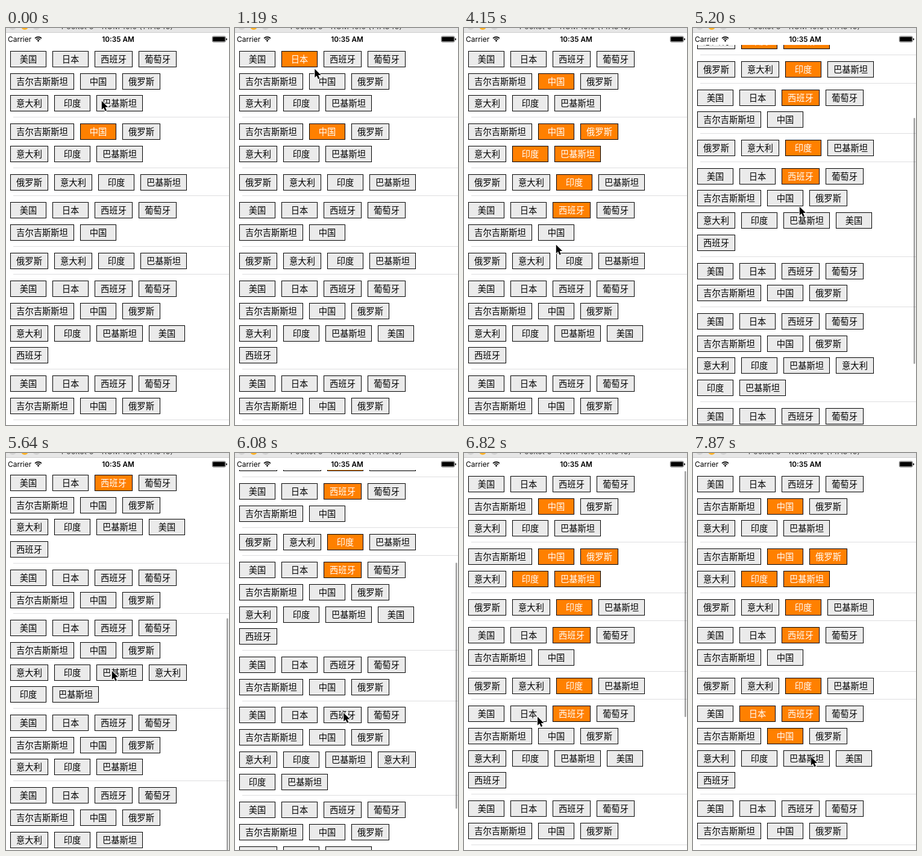
An HTML page with a canvas that plays this animation: 370 by 657 pixels, repeating every 8000 ms.

```html
<!DOCTYPE html>
<html lang="zh-CN">
<head>
<meta charset="utf-8">
<title>Tag list</title>
<style>
  html, body { margin: 0; width: 100%; height: 100%; overflow: hidden; background: #fff; }
  canvas { display: block; }
</style>
</head>
<body>
<canvas id="stage" width="370" height="657"></canvas>
<script>
(() => {
  const ctx = document.getElementById('stage').getContext('2d');
  const W = 370, H = 657;
  const LOOP = 8000, STEP = 148.5;
  const CLIP = 28, ROW = 36.7, GAP = 10, FIRST = 51.5, WRAP = 320;
  const PEAK = 382.6, MAX_SCROLL = 370;
  const BAR_TOP = 30, BAR_LEN = 407, BAR_RATIO = 0.637;
  const TAP_DELAY = 2;
  const LATIN = 'Inter, Roboto, sans-serif';
  const CJK = '"Noto Sans CJK SC", "Noto Sans CJK", sans-serif';

  const names = '美国 日本 西班牙 葡萄牙 吉尔吉斯斯坦 中国 俄罗斯 意大利 印度 巴基斯坦'.split(' ');
  const sections = [
    names, names.slice(4), names.slice(6), names.slice(0, 6), names.slice(6),
    [...names, names[0], names[2]],
    names.slice(0, 7),
    [...names, ...names.slice(7)],
    names, names
  ];

  // Pointer stops: step, x, y, tap
  const stops = [
    [0, 158, 120, 1], [5, 113, 46, 1], [6, 113, 46], [10, 150, 88, 1], [13, 205, 190],
    [15, 211, 164, 1], [17, 110, 205, 1], [19, 180, 205, 1], [21, 178, 255, 1], [22, 174, 288],
    [24, 172, 300, 1], [28, 152, 358], [29, 165, 380, 1], [31, 172, 428, 1], [35, 176, 295],
    [38, 175, 360], [43, 182, 467], [47, 110, 430, 1], [50, 150, 466, 1], [52, 195, 489],
    [53, 195, 502]
  ];

  function ease(k, from, to) {
    const u = Math.max(0, Math.min(1, (k - from) / (to - from)));
    return u * u * (3 - 2 * u);
  }

  // One flick to the end of the list, one back to the start.
  const scrollAt = k => PEAK * (ease(k, 32, 38.1) - ease(k, 38.1, 45.04));

  function pointerAt(k) {
    const n = Math.max(1, stops.findIndex(s => s[0] >= k));
    const [k0, x0, y0] = stops[n - 1], [k1, x1, y1] = stops[n];
    const u = ease(k, k0, k1);
    return [x0 + (x1 - x0) * u, y0 + (y1 - y0) * u];
  }

  // Lay out the tags once; only the scroll offset changes later.
  const tags = [], rules = [];
  let rowY = FIRST;
  sections.forEach((list, section) => {
    let x = 7;
    for (const text of list) {
      const w = Math.max(60, text.length * 14.3 + 20);
      if (x + w > WRAP) { x = 7; rowY += ROW; }
      tags.push({ text, section, x, y: rowY, w, on: Infinity, off: Infinity });
      x += w + 10;
    }
    rowY += ROW + GAP;
    rules.push(rowY - 23.9);
  });

  // A tap selects the tag under it; the first section allows one choice only.
  tags.find(t => t.section === 1 && t.text === '中国').on = 0;
  for (const [k, x, y, tap] of stops) {
    if (!tap) continue;
    const hit = tags.find(t => x >= t.x && x <= t.x + t.w && Math.abs(y - t.y) <= 14);
    if (!hit) continue;
    const at = k + TAP_DELAY;
    if (hit.section === 0) {
      for (const t of tags) if (t.section === 0 && t.on < at) t.off = Math.min(t.off, at);
    }
    hit.on = at;
  }

  function label(text, x, y, font, color, align = 'left') {
    ctx.font = font;
    ctx.fillStyle = color;
    ctx.textAlign = align;
    ctx.fillText(text, x, y);
  }

  function disc(x, y, r, color) {
    ctx.fillStyle = color;
    ctx.beginPath();
    ctx.arc(x, y, r, 0, Math.PI * 2);
    ctx.fill();
  }

  function drawTag(tag, y, on) {
    const x = Math.round(tag.x), t = Math.round(y - 13.5);
    const w = Math.round(tag.x + tag.w) - x;
    ctx.fillStyle = on ? '#ff8000' : '#ebebeb';
    ctx.fillRect(x, t, w, 27);
    ctx.strokeStyle = '#000';
    ctx.lineWidth = 1;
    ctx.strokeRect(x + 0.5, t + 0.5, w - 1, 26);
    label(tag.text, x + w / 2, t + 19, '14.3px ' + CJK, on ? '#fff' : '#000', 'center');
  }

  function drawList(k, offset) {
    ctx.save();
    ctx.beginPath();
    ctx.rect(0, CLIP, W, H - CLIP);
    ctx.clip();
    ctx.fillStyle = '#dedee0';
    for (const y of rules) ctx.fillRect(12, Math.floor(y - offset), W - 12, 1);
    for (const tag of tags) {
      const y = tag.y - offset;
      if (y > CLIP - 15 && y < H + 15) drawTag(tag, y, k >= tag.on && k < tag.off);
    }
    ctx.restore();
  }

  function drawBar(k, offset) {
    const alpha = k < 33 ? 0 : 1 - ease(k, 46, 50);
    if (!alpha) return;
    const len = BAR_LEN - Math.max(0, offset - MAX_SCROLL);
    ctx.fillStyle = `rgba(0,0,0,${0.38 * alpha})`;
    ctx.beginPath();
    ctx.roundRect(366, BAR_TOP + offset * BAR_RATIO, 2.5, len, 1.2);
    ctx.fill();
  }

  function drawWifi(x, y) {
    ctx.strokeStyle = ctx.fillStyle = '#000';
    ctx.lineWidth = 1.7;
    const from = -Math.PI * 0.75, to = -Math.PI * 0.25;
    for (const r of [4.6, 7.6]) {
      ctx.beginPath();
      ctx.arc(x, y, r, from, to);
      ctx.stroke();
    }
    ctx.beginPath();
    ctx.moveTo(x, y + 0.5);
    ctx.arc(x, y, 2.5, from, to);
    ctx.fill();
  }

  function drawBattery() {
    ctx.lineWidth = 0.6;
    ctx.beginPath();
    ctx.roundRect(342.3, 13.8, 22, 9.4, 2);
    ctx.stroke();
    ctx.beginPath();
    ctx.roundRect(343.2, 14.7, 20.2, 7.6, 1.2);
    ctx.roundRect(365.2, 16.9, 1.6, 3.4, 0.8);
    ctx.fill();
  }

  function drawStatus() {
    ctx.fillStyle = '#e6e6e6';
    ctx.fillRect(0, 0, W, 7);
    ctx.fillStyle = '#cfcfcf';
    ctx.fillRect(0, 7, W, 1);
    disc(11, -3, 6, '#d2d2d2');
    disc(31, -3, 6, '#fdb124');
    disc(50.5, -3, 6, '#d2d2d2');
    label('Pocket 6 - ROM 10.0 (14A345)', 184.5, 2, '13px ' + LATIN, '#444', 'center');
    label('Carrier', 3, 22.5, '12px ' + LATIN, '#000');
    label('10:35 AM', 186, 22.5, '600 11.8px ' + LATIN, '#000', 'center');
    drawWifi(53.5, 22.5);
    drawBattery();
  }

  const arrow = new Path2D('M0 0V14.2L3.3 11.2L5.7 16.6L8.2 15.5L5.8 10.3H10.4Z');

  function drawPointer([x, y]) {
    ctx.save();
    ctx.translate(x + 0.8, y + 0.8);
    ctx.lineJoin = 'round';
    ctx.lineWidth = 2;
    ctx.strokeStyle = '#fff';
    ctx.stroke(arrow);
    ctx.fillStyle = '#000';
    ctx.fill(arrow);
    ctx.restore();
  }

  function draw(t) {
    const k = Math.floor((t % LOOP + 16) / STEP);
    const offset = scrollAt(k);
    ctx.fillStyle = '#fff';
    ctx.fillRect(0, 0, W, H);
    drawList(k, offset);
    drawBar(k, offset);
    drawStatus();
    drawPointer(pointerAt(k));
  }

  const start = performance.now();
  function tick() {
    draw(performance.now() - start);
    requestAnimationFrame(tick);
  }
  tick();
})();
</script>
</body>
</html>
```
